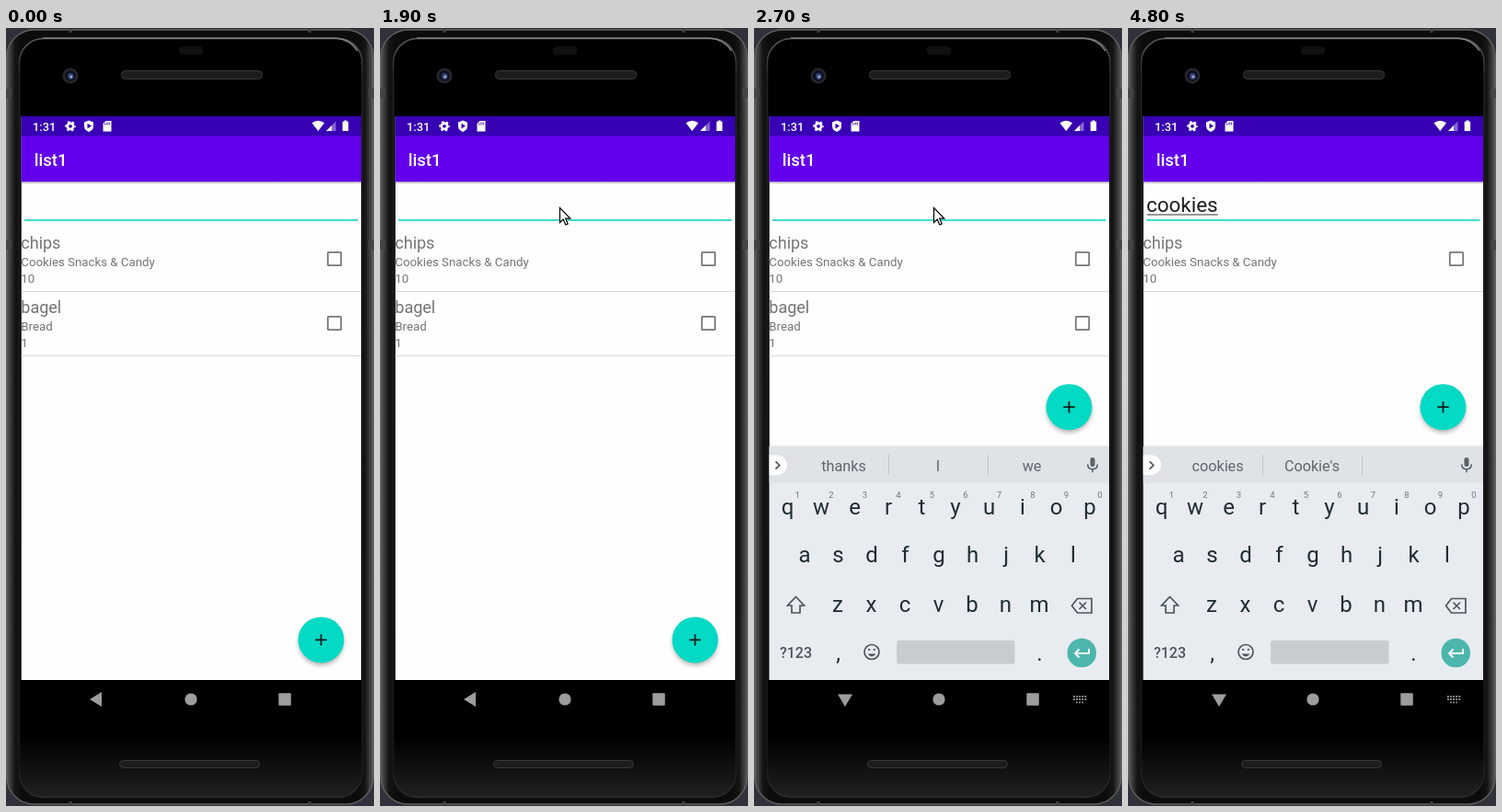
Animation, 400 px wide and 846 px high, one loop 5300 ms. Source, as an HTML page:

```html
<!DOCTYPE html>
<html lang="en">
<head>
<meta charset="utf-8">
<title>Shopping list search</title>
<style>
  html, body { margin: 0; width: 100%; height: 100%; overflow: hidden; background: #30313a; }
  svg { display: block; width: 400px; height: 846px; font-family: Roboto, sans-serif; }
  .mid { text-anchor: middle; }
  .name { font-size: 18px; fill: #747474; }
  .info { font-size: 13.25px; fill: #747474; }
  .key { font-size: 24px; fill: #202c33; }
  .hint { font-size: 9.5px; fill: #6d767c; }
  .word { font-size: 16.2px; fill: #5f666b; }
  .line { fill: none; stroke: #4c565c; stroke-width: 1.7; }
</style>
</head>
<body>
<svg viewBox="0 0 400 846">
  <defs>
    <linearGradient id="rim">
      <stop offset="0" stop-color="#5a5a5a"/>
      <stop offset=".01" stop-color="#3c3c3c"/>
      <stop offset=".022" stop-color="#161616"/>
      <stop offset=".04" stop-color="#0c0c0c"/>
      <stop offset=".96" stop-color="#0c0c0c"/>
      <stop offset=".978" stop-color="#161616"/>
      <stop offset=".99" stop-color="#3c3c3c"/>
      <stop offset="1" stop-color="#5a5a5a"/>
    </linearGradient>
    <linearGradient id="face" x2="0" y2="1">
      <stop offset=".92" stop-color="#000"/>
      <stop offset="1" stop-color="#202020"/>
    </linearGradient>
    <linearGradient id="glint" x2="0" y2="1">
      <stop offset="0" stop-color="#5c5c5c"/>
      <stop offset=".05" stop-color="#242424"/>
      <stop offset=".95" stop-color="#181818"/>
      <stop offset="1" stop-color="#2c2c2c"/>
    </linearGradient>
    <linearGradient id="drop" x2="0" y2="1">
      <stop offset="0" stop-color="#000" stop-opacity=".24"/>
      <stop offset="1" stop-color="#000" stop-opacity="0"/>
    </linearGradient>
    <pattern id="mesh" width="3" height="3" patternUnits="userSpaceOnUse">
      <rect width="3" height="3" fill="#222"/>
      <path d="M0 3L3 0" stroke="#111"/>
    </pattern>
    <filter id="soft" x="-30%" y="-30%" width="160%" height="160%"><feGaussianBlur stdDeviation="2.6"/></filter>
    <clipPath id="glass"><rect x="16.7" y="96" width="369.3" height="617"/></clipPath>
  </defs>

  <!-- phone body -->
  <rect width="400" height="846" fill="#30313a"/>
  <rect x=".7" y="2" width="398.600" height="842" rx="30" fill="url(#rim)" stroke="#606060" stroke-width="1.400"/>
  <path d="M0 66h6v10H0zM0 231h6v10H0zM394 66h6v10h-6zM394 231h6v10h-6z" fill="#444"/>
  <path d="M70 1v4M330 1v4M70 841v4M330 841v4" stroke="#444" stroke-width="3"/>
  <rect x="14.500" y="11.500" width="372.500" height="825" rx="26" fill="url(#face)" stroke="url(#glint)" stroke-width="1.500"/>
  <path d="M40 11H358Q374 12 382 25" fill="none" stroke="#808080" stroke-width="1.400"/>
  <rect x="188" y="20" width="26" height="9" rx="4" fill="#101012"/>
  <circle cx="70" cy="52" r="8.500" fill="#25252a"/>
  <circle cx="70" cy="52" r="5.800" fill="#0b0e20"/>
  <circle cx="70.300" cy="52.500" r="3.400" fill="#34426f"/>
  <circle cx="70.800" cy="53" r="1.500" fill="#a3aed6"/>
  <g fill="url(#mesh)" stroke="#383838">
    <rect x="125.500" y="46.500" width="153" height="9" rx="4"/>
    <rect x="123.500" y="796.500" width="152" height="8" rx="4"/>
  </g>

  <!-- navigation bar -->
  <g fill="#9d9d9d">
    <path id="back"/>
    <circle cx="201" cy="730" r="6.600"/>
    <rect x="296.300" y="723.300" width="13.500" height="13.500" rx="1"/>
    <path id="imeIcon" d="M347 727h15M347 730h15M350 733.300h9" fill="none" stroke="#8c8c8c" stroke-width="1.800" stroke-dasharray="1.900 1.200"/>
  </g>

  <!-- app -->
  <g clip-path="url(#glass)">
    <rect x="16" y="96" width="370" height="613" fill="#fefefe"/>
    <rect x="16" y="167" width="370" height="3.500" fill="url(#drop)"/>
    <rect x="16" y="96" width="370" height="22" fill="#3700b3"/>
    <rect x="16" y="117.300" width="370" height="49.900" fill="#6200ee"/>
  </g>
  <g fill="#fff">
    <text x="29" y="111.500" font-size="12.800" font-weight="500">1:31</text>
    <circle cx="70" cy="106.800" r="3.200" fill="none" stroke="#fff" stroke-width="2.600"/>
    <circle cx="70" cy="106.800" r="5" fill="none" stroke="#fff" stroke-width="1.600" stroke-dasharray="2.600 2.636" stroke-dashoffset="1.300"/>
    <path d="M90 100.500l5 2v4q0 4.500-5 6.500q-5-2-5-6.500v-4z"/>
    <path d="M88.500 103.800l4.500 2.800-4.500 2.800z" fill="#3700b3"/>
    <path d="M108.500 101h6v11.500h-9v-8.500z"/>
    <path d="M107.700 103.500v2M110 102.500v3M112.200 102.500v3" stroke="#3700b3"/>
    <path d="M332.500 103.300q6.800-5 13.600 0L339.300 112z"/>
    <path d="M358.500 101.500V112H348z" opacity=".4"/>
    <path d="M354 106V112h-6z"/>
    <path d="M367.500 100.500h3v1.300h1.700V112h-6.500v-10.200h1.800z"/>
    <text x="30.700" y="149.500" font-size="18.600" font-weight="500">list1</text>
  </g>
  <path d="M20 209H382.500" stroke="#03cfbb" stroke-width="1.700"/>
  <text id="query" x="20" y="200.300" font-size="22.450" fill="#1d1d1d"></text>
  <path id="underline" stroke="#333" stroke-width="1.200"/>
  <path id="caret" stroke="#03dac5" stroke-width="1.700"/>
  <g id="rows" clip-path="url(#glass)"></g>
  <g id="fab">
    <circle cx="342.500" cy="3" r="24.500" opacity=".3" filter="url(#soft)"/>
    <circle cx="342.500" cy="0" r="25" fill="#03dac5"/>
    <path d="M336.300 0h12.400M342.500-6.200v12.400" stroke="#101c1b" stroke-width="1.800"/>
  </g>

  <!-- soft keyboard -->
  <g clip-path="url(#glass)"><g id="keyboard">
    <rect x="16" y="453.500" width="370" height="2" fill="#000" opacity=".06"/>
    <rect x="16" y="455" width="370" height="254" fill="#e8ecf1"/>
    <rect x="16" y="455" width="370" height="40" fill="#dfe3e8"/>
    <path d="M146.500 464v22M254.500 464v22" stroke="#c2c7cb"/>
    <rect x="6" y="464.500" width="30" height="21.500" rx="10.750" fill="#fff"/>
    <path d="M23.500 471.300l4.200 4.200-4.200 4.200" class="line"/>
    <rect x="365.500" y="467" width="5" height="10" rx="2.500" fill="#596167"/>
    <path d="M362.700 474.500q0 5.200 5.300 5.200t5.300-5.200M368 479.700v3.500" class="line" style="stroke-width:1.500"/>
    <g id="words"></g>
    <g id="keys"></g>
    <path d="M45.500 618.500l9 9.500h-4.500v8h-9v-8h-4.500z" class="line"/>
    <path d="M351.500 620.500h15.500v15.500h-15.500l-6-7.750zM353.500 624.500l7.500 7.500M361 624.500l-7.500 7.500" class="line"/>
    <text x="45.500" y="684.500" class="mid" font-size="16" font-weight="500" fill="#4c565c">?123</text>
    <circle cx="128" cy="678.500" r="8" class="line"/>
    <path d="M123.500 680.500q4.500 6 9 0z" fill="#4c565c"/>
    <path d="M125.200 675v2M130.800 675v2" class="line" style="stroke-width:2"/>
    <rect x="155" y="666" width="128.500" height="25.500" rx="2.500" fill="#c8ccd0"/>
    <circle cx="356.300" cy="679.500" r="15.800" fill="#4db6ac"/>
    <path d="M364 675v5h-14.500M353.500 675.500l-4.500 4.500 4.500 4.500" fill="none" stroke="#fff" stroke-width="1.900"/>
  </g></g>

  <path id="pointer" d="M.5 .5V16.500L4.200 13 6.800 19 9.200 18 6.700 12.200H11.800Z" fill="#fff" stroke="#000" stroke-width="1.200"/>
</svg>
<script>
const LOOP = 5300, STEP = 100;
const $ = id => document.getElementById(id);
const NS = 'http://www.w3.org/2000/svg';

function add(parent, tag, attrs, content = '') {
  const node = document.createElementNS(NS, tag);
  for (const name in attrs) node.setAttribute(name, attrs[name]);
  node.textContent = content;
  parent.append(node);
  return node;
}
const show = (node, on) => { node.style.display = on ? '' : 'none'; };

function addRow(y, name, kind, count) {
  const row = add($('rows'), 'g', { transform: `translate(0 ${y})` });
  add(row, 'text', { x: 16.3, y: 23, class: 'name' }, name);
  add(row, 'text', { x: 16.3, y: 42.3, class: 'info' }, kind);
  add(row, 'text', { x: 16.3, y: 60.3, class: 'info' }, count);
  add(row, 'rect', { x: 349.8, y: 26.8, width: 14.4, height: 14.4, rx: .8, fill: 'none', stroke: '#777', 'stroke-width': 1.8 });
  add(row, 'path', { d: 'M16 69.500H386', stroke: '#dadade' });
  return row;
}
addRow(217, 'chips', 'Cookies Snacks & Candy', '10');
const bagel = addRow(287, 'bagel', 'Bread', '1');

function addKeys(letters, x, y) {
  [...letters].forEach((letter, i) =>
    add($('keys'), 'text', { x: x + 36.5 * i, y, class: 'key mid' }, letter));
}
addKeys('qwertyuiop', 36.5, 529);
addKeys('asdfghjkl', 55, 581);
addKeys('zxcvbnm', 91, 635);
addKeys(',', 91.5, 688);
addKeys('.', 310.5, 688);
[...'1234567890'].forEach((digit, i) =>
  add($('keys'), 'text', { x: 47.5 + 36.5 * i, y: 511, class: 'hint mid' }, digit));

const words = [97.5, 200, 302].map(x => add($('words'), 'text', { x, y: 481.5, class: 'word mid' }));

// time, typed text, suggestions, whether the middle one is emphasised
const typing = [
  [0, '', 'thanks,I,we', false],
  [2900, 'c', 'c,can,call', true],
  [3100, 'co', 'co,come,Co', true],
  [3200, 'coo', 'coo,cool,Co', true],
  [3400, 'cook', 'cook,cooking,cooked', true],
  [3500, 'cooki', 'cooki,cooking,cookies', true],
  [4000, 'cookie', 'cookie,Cookie,cookies', false],
  [4300, 'cookies', "cookies,Cookie's,", false],
];
// time, x, y of the pointer tip; no position means off stage
const travel = [
  [0], [600, 378, 690], [700, 325, 590], [800, 286, 445], [900, 240, 302],
  [1000, 207, 216], [1100, 195, 195], [4600, 245, 230], [4700, 358, 660], [4800],
];
const at = (table, t) => table.findLast(entry => entry[0] <= t);

function caretOn(t, typedAt) {
  if (t < 2400) return false;
  const since = t - (typedAt || 2200);
  return since % 1000 < 500;
}

function draw(t) {
  const focused = t >= 2300;
  const [typedAt, text, hints, strong] = at(typing, t);

  $('query').textContent = text;
  const end = 20 + (text ? $('query').getComputedTextLength() : .8);
  $('underline').setAttribute('d', text ? `M20.500 203H${end}` : '');
  $('caret').setAttribute('d', `M${end + .3} 176.500V206.500`);
  show($('caret'), caretOn(t, typedAt));
  show(bagel, !text);

  hints.split(',').forEach((hint, i) => { words[i].textContent = hint; });
  words[1].style.fontWeight = strong ? 700 : 400;
  words[1].style.fill = strong ? '#000' : '';

  $('fab').setAttribute('transform', `translate(0 ${focused ? 412.2 : 665.4})`);
  $('back').setAttribute('d', focused ? 'M91 724.500H107L99 738Z' : 'M91 730L104 722V738Z');
  show($('imeIcon'), focused);

  const sliding = t < 2500;
  show($('keyboard'), t >= 2400);
  $('keyboard').setAttribute('transform', `translate(0 ${sliding ? 4 : 0})`);
  $('keyboard').setAttribute('opacity', sliding ? .94 : 1);

  const [, x, y] = at(travel, t);
  show($('pointer'), x !== undefined);
  if (x !== undefined) $('pointer').setAttribute('transform', `translate(${x} ${y})`);
}

const start = performance.now();
function tick() {
  const t = (performance.now() - start) % LOOP;
  draw(Math.floor(t / STEP) * STEP);
  requestAnimationFrame(tick);
}
tick();
</script>
</body>
</html>
```
